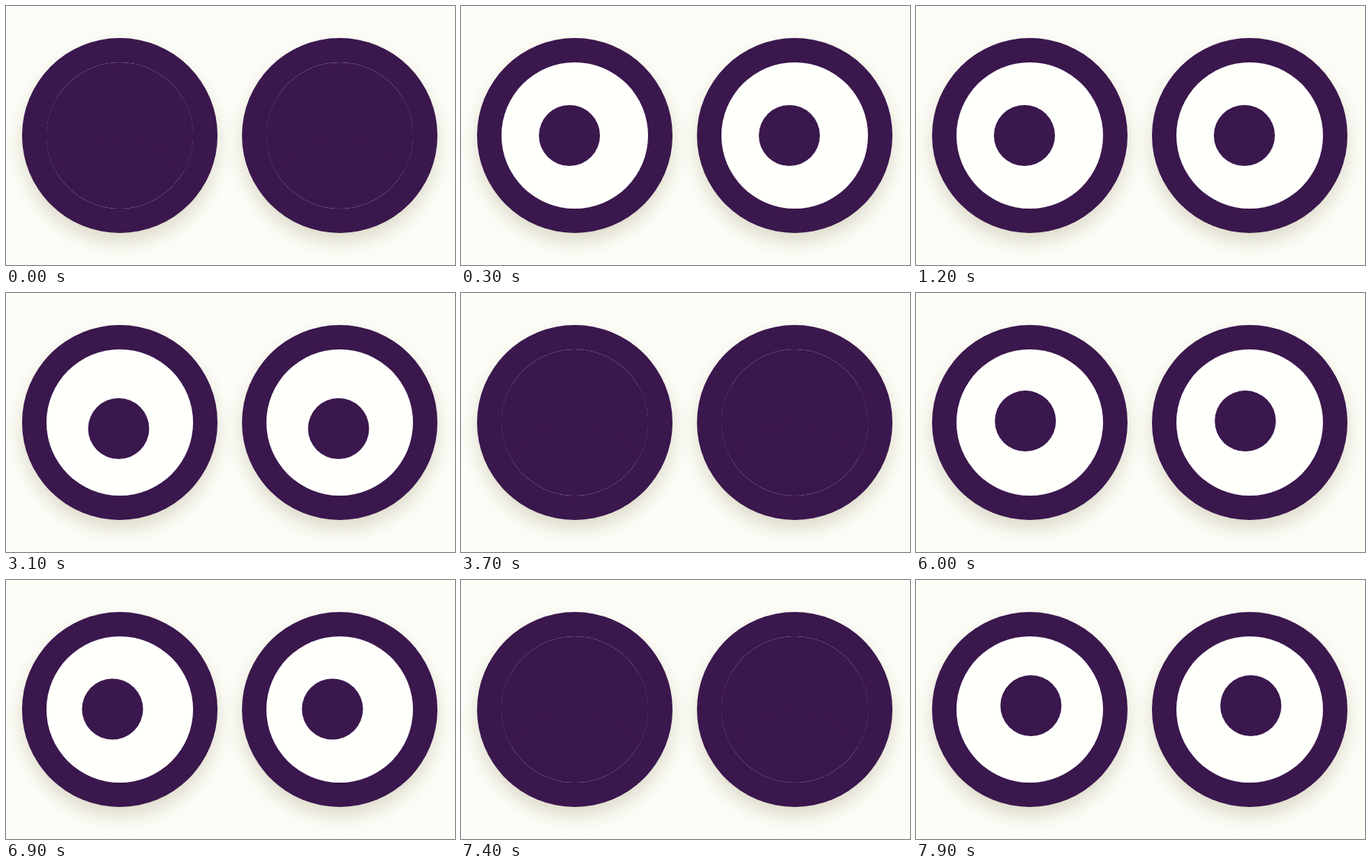
Write an HTML page that moves like this. It is 588 px wide and 340 px high and loops after 8000 ms.

```html
<!DOCTYPE html>
<html lang="en">
<head>
<meta charset="utf-8">
<title>Blinking eyes</title>
<style>
  :root { --dark: #3a174d; --light: #fffffc; }
  html, body { margin: 0; width: 100%; height: 100%; overflow: hidden; background: #fdfdf8; }
  .eye, .white, .pupil, .lid { position: absolute; border-radius: 50%; }
  .eye {
    left: 21px; top: 42px; width: 256px; height: 256px;
    background: var(--dark);
    box-shadow: 0 12px 24px rgba(150, 138, 95, .3);
  }
  .eye + .eye { left: 309px; }
  .white { inset: 32px; background: var(--light); }
  .pupil { left: 56px; top: 56px; width: 80px; height: 80px; background: var(--dark); }
  .lid { inset: 0; }
</style>
</head>
<body>
<div class="eye"><div class="white"><div class="pupil"></div><div class="lid"></div></div></div>
<div class="eye"><div class="white"><div class="pupil"></div><div class="lid"></div></div></div>
<script>
const LOOP = 8000;
const BLINK_EVERY = 1850;
const HOLD = 35;    // fully closed this long either side of a blink
const SWEEP = 165;  // time for the lids to travel
const RADIUS = 96;

// the gaze drifts between a few points
const gaze = [
  { at: 1200, x: -7, y: 0 },
  { at: 3100, x: -1.5, y: 8 },
  { at: 4800, x: 0, y: -4 },
  { at: 6900, x: -9.5, y: -.5 },
  { at: 7900, x: 1.5, y: -5 }
];

const pupils = document.querySelectorAll('.pupil');
const lids = document.querySelectorAll('.lid');
const clamp = p => Math.min(1, Math.max(0, p));
const ease = p => p * p * (3 - 2 * p);
const mix = (a, b, p) => a + (b - a) * p;

function lookAt(t) {
  const next = gaze.find(g => g.at > t) || gaze.at(-1);
  const prev = gaze.findLast(g => g.at <= t) || gaze[0];
  const p = ease(clamp((t - prev.at) / (next.at - prev.at || 1)));
  return [mix(prev.x, next.x, p), mix(prev.y, next.y, p)];
}

function closure(t) {
  const gap = Math.abs(t - Math.round(t / BLINK_EVERY) * BLINK_EVERY);
  return 1 - ease(clamp((gap - HOLD) / SWEEP));
}

function draw(t) {
  const [x, y] = lookAt(t);
  const drop = closure(t) * (RADIUS + 1);
  const shadow = drop > 0
    ? `inset 0 ${drop}px 0 var(--dark), inset 0 ${-drop}px 0 var(--dark)`
    : 'none';
  pupils.forEach(el => el.style.transform = `translate(${x}px, ${y}px)`);
  lids.forEach(el => el.style.boxShadow = shadow);
}

const start = performance.now();
function tick() {
  draw((performance.now() - start) % LOOP);
  requestAnimationFrame(tick);
}
draw(0);
requestAnimationFrame(tick);
</script>
</body>
</html>
```
